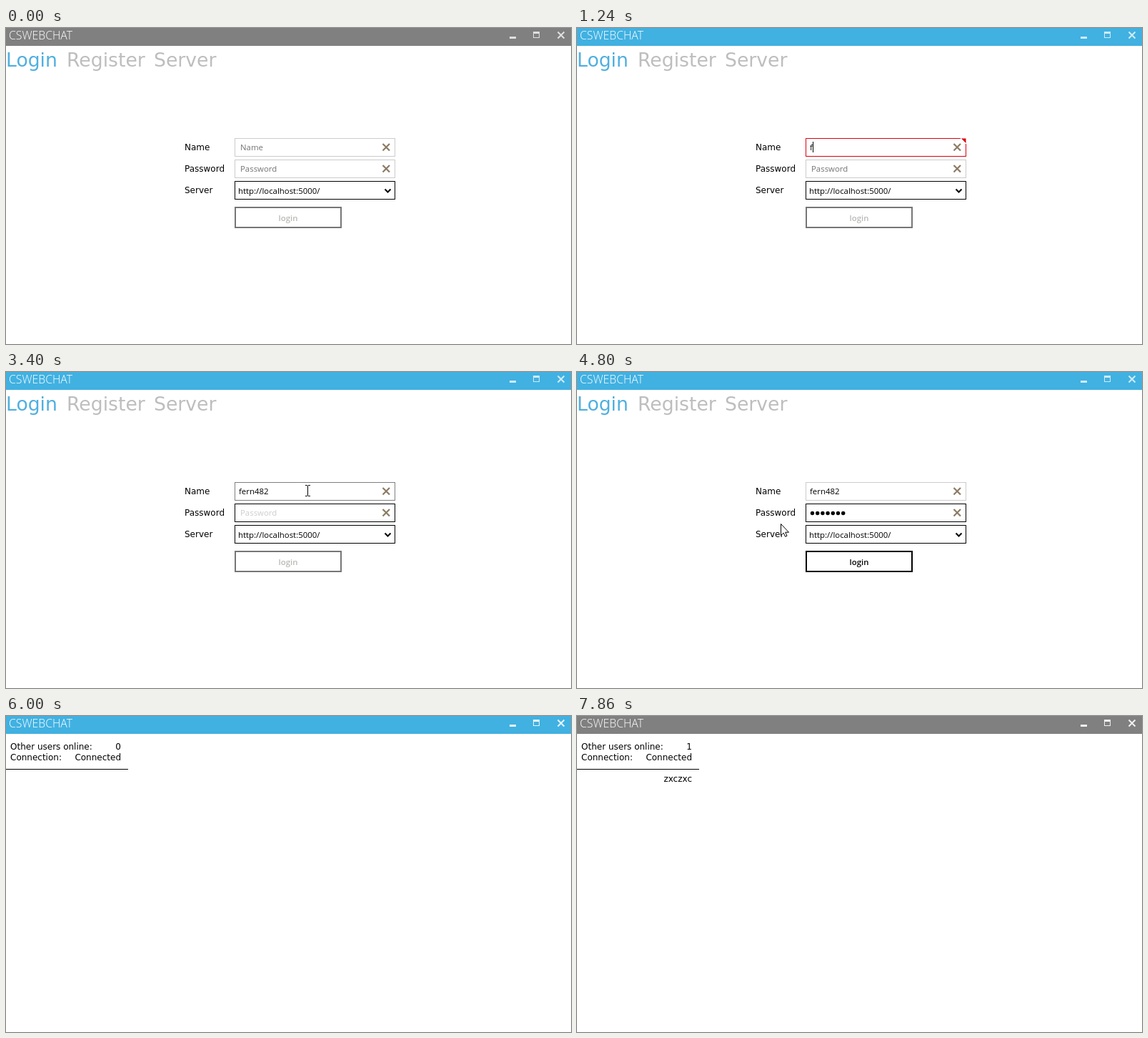
An HTML page for the animation above (8 s loop, 791 by 442 pixels).

```html
<!DOCTYPE html>
<html lang="en">
<head>
<meta charset="utf-8">
<title>Chat login</title>
<style>
  html, body { margin: 0; width: 100%; height: 100%; overflow: hidden; background: #fff; }
  svg { display: block; width: 791px; height: 442px; }
  text { font: 12px "DejaVu Sans", sans-serif; white-space: pre; }
  .ui { font: 11.4px "Open Sans", "Noto Sans", sans-serif; }
  .title { font: 300 15.8px "Open Sans", "Noto Sans", sans-serif; fill: #fff; }
  .tab { font-size: 26.67px; fill: #bebebe; }
  .tab.on { fill: #4fafdf; }
  .bold { font-weight: 600; text-anchor: middle; }
  .end { text-anchor: end; }
  .box { fill: #fff; stroke: #ccc; shape-rendering: crispEdges; }
  .clear { fill: none; stroke: #8c7b63; stroke-width: 2.2; }
  .crisp { shape-rendering: crispEdges; }
</style>
</head>
<body>
<svg viewBox="0 0 791 442">
  <defs>
    <filter id="shadow" x="-5%" y="-20%" width="110%" height="150%">
      <feDropShadow dx="1.5" dy="1.5" stdDeviation="1" flood-opacity=".4"/>
    </filter>
    <path id="cross" d="M527.5 -5L537 4.5M537 -5L527.5 4.5"/>
  </defs>

  <rect id="bar" class="crisp" width="791" height="25"/>
  <text class="title" x="4" y="16">CSWEBCHAT</text>
  <g id="controls" fill="#fff">
    <path class="crisp" d="M705 12h9v3h-9zM738 5h9v9h-9zM739 8v5h7v-5z" fill-rule="evenodd"/>
    <path d="M772.5 5.5l9 9m0-9l-9 9" stroke="#fff" stroke-width="2"/>
  </g>

  <g id="login">
    <text class="tab on" x="0" y="54">Login</text>
    <text class="tab" x="85" y="54">Register</text>
    <text class="tab" x="207" y="54">Server</text>

    <text x="250" y="171">Name</text>
    <text x="250" y="201">Password</text>
    <text x="250" y="231">Server</text>

    <rect id="nameBox" class="box" x="320.5" y="154.5" width="224" height="25"/>
    <text id="nameHint" class="ui" x="328" y="171">Name</text>
    <text id="name" class="ui" x="326" y="171"></text>
    <use href="#cross" y="167" class="clear"/>
    <path id="corner" d="M537 154h8v8z" fill="#dc000c" stroke="#fff"/>

    <rect id="passBox" class="box" x="320.5" y="184.5" width="224" height="25"/>
    <text id="passHint" class="ui" x="328" y="201">Password</text>
    <g id="dots"></g>
    <use href="#cross" y="197" class="clear"/>

    <rect class="box" x="320.5" y="214.5" width="224" height="25" style="stroke:#000"/>
    <text class="ui" x="325" y="232">http://localhost:5000/</text>
    <path d="M530.5 225.5l4 4 4-4" fill="none" stroke="#000" stroke-width="2"/>

    <rect id="button" class="crisp" x="321" y="251" width="148" height="28" stroke-width="2"/>
    <text id="buttonText" class="ui bold" x="395" y="270">login</text>

    <rect id="caret" class="crisp" width="1" height="15"/>
    <g id="tip">
      <rect x="550" y="154" width="220" height="24" rx="2" fill="#ea535d" filter="url(#shadow)"/>
      <text class="ui" x="558" y="171" fill="#fff">Name must contain 4 to 20 characters.</text>
    </g>
  </g>

  <g id="main">
    <text x="6" y="47">Other users online:</text>
    <text id="count" class="end" x="161" y="47"></text>
    <text x="6" y="62">Connection:</text>
    <text class="end" x="161" y="62">Connected</text>
    <rect class="crisp" y="74" width="171" height="1"/>
    <text id="user" class="end" x="161" y="92">zxczxc</text>
  </g>

  <g id="mouse">
    <path id="arrow" d="M.5 .5V16.5L4.2 13.2 6.6 18.3 9 17.2 6.7 12.2H11.5Z" fill="#fff" stroke="#000"/>
    <path id="beam" class="crisp" d="M-3 -7.5h3m1 0h3M.5 -7V7M-3 7.5h3m1 0h3" fill="none" stroke="#000"/>
  </g>
</svg>

<script>
const LOOP = 8000;
const el = {};
document.querySelectorAll('svg [id]').forEach(node => el[node.id] = node);

const nameKeys = [1240, 1400, 1550, 1700, 2400, 2480, 2600];
const passKeys = [3490, 3570, 3720, 3800, 3900, 4000, 4100];
const rest = [422, 166];
// Waypoints from the name field to the button
const toButton = [[400, 175], [345, 192], [285, 212], [250, 232], [270, 245],
  [315, 258], [345, 264], [365, 266], [373, 266], [399, 265]];
const leave = [[430, 266], [560, 262], [720, 256]];

el.dots.innerHTML = passKeys.map((_, i) =>
  `<circle cx="${329.5 + 7.2 * i}" cy="197.5" r="2.7"/>`).join('');

const during = (t, from, to) => t >= from && t < to;
const ramp = (t, from, to) => Math.min(1, Math.max(0, (t - from) / (to - from)));
const typed = (t, keys) => keys.filter(k => t >= k).length;
const show = (node, on) => { node.style.display = on ? '' : 'none'; };
const fade = (node, opacity) => { node.style.opacity = opacity; };
const stepOf = (t, start, length) => Math.floor((t - start) / length);

function pointer(t) {
  if (t < 4630) {
    const p = Math.min(1, Math.max(0, stepOf(t, 70, 80)) / 5);
    const eased = 1 - (1 - p) ** 2;
    return [634 + (rest[0] - 634) * eased, 407 + (rest[1] - 407) * eased];
  }
  if (t < 5440) return toButton[Math.min(9, stepOf(t, 4630, 81))];
  if (t < 5590) return [391, 265];
  if (t < 5760) return [369, 264];
  return leave[Math.min(2, stepOf(t, 5760, 80))];
}

function drawMouse(t) {
  const [x, y] = pointer(t).map(Math.round);
  const inField = t < 5760 && during(x, 320, 545) && (during(y, 154, 180) || during(y, 184, 210));
  show(el.mouse, during(t, 70, 1240) || during(t, 2870, 6000));
  el.mouse.setAttribute('transform', `translate(${x} ${y})`);
  show(el.arrow, !inField);
  show(el.beam, inField);
  return during(y, 154, 180) && inField;
}

function drawFields(t, overName) {
  const letters = typed(t, nameKeys), count = typed(t, passKeys);
  const invalid = during(t, 1240, 1700);
  const nameFocus = during(t, 700, 2790), passFocus = during(t, 2790, 5110);

  el.name.textContent = 'fern482'.slice(0, letters);
  el.nameBox.style.stroke = invalid ? '#dc000c' : nameFocus ? '#000'
    : overName ? '#7f7f7f' : '#ccc';
  el.passBox.style.stroke = passFocus ? '#000' : '#ccc';
  show(el.corner, invalid);
  show(el.nameHint, !letters);
  show(el.passHint, !count);
  fade(el.nameHint, .55 - .35 * ramp(t, 620, 860));
  fade(el.passHint, .55 - .35 * ramp(t, 2710, 3020));
  [...el.dots.children].forEach((dot, i) => show(dot, i < count));

  const slide = ramp(t, 1240, 1400);
  show(el.tip, during(t, 1320, 1780));
  fade(el.tip, slide);
  el.tip.setAttribute('transform', `translate(${-12 * (1 - slide)} 0)`);

  const inName = during(t, 780, 2230) || during(t, 2400, 2790);
  const inPass = during(t, 2870, 3400) || during(t, 3490, 4630);
  show(el.caret, inName || inPass);
  const end = inName ? (letters ? el.name.getComputedTextLength() : 0) : 7.2 * count;
  el.caret.setAttribute('x', Math.round(326 + end));
  el.caret.setAttribute('y', inName ? 159 : 189);
}

function drawButton(t) {
  const enabled = t >= 3490, hover = t >= 5030;
  el.button.style.fill = hover ? '#000' : '#fff';
  el.button.style.stroke = enabled ? '#000' : '#767676';
  el.buttonText.style.fill = hover ? '#fff' : enabled ? '#000' : '#b8b8b4';
}

function drawPages(t) {
  const p = t < 5760 ? 0 : Math.min(1, (stepOf(t, 5760, 80) + 1) / 4);
  show(el.login, p < 1);
  show(el.main, p > 0);
  fade(el.login, 1 - p);
  fade(el.main, p);
  el.login.setAttribute('transform', `translate(${-30 * p} 0)`);
  el.main.setAttribute('transform', `translate(${30 * (1 - p)} 0)`);
  el.bar.style.fill = during(t, 700, 7150) ? '#41b1e1' : '#808080';
  fade(el.controls, t < 5760 ? .75 : .88);
  el.count.textContent = t < 7860 ? '0' : '1';
  show(el.user, t >= 7860);
}

const start = performance.now();
function render() {
  const t = (performance.now() - start) % LOOP;
  drawPages(t);
  drawFields(t, drawMouse(t));
  drawButton(t);
  requestAnimationFrame(render);
}
render();
</script>
</body>
</html>
```
